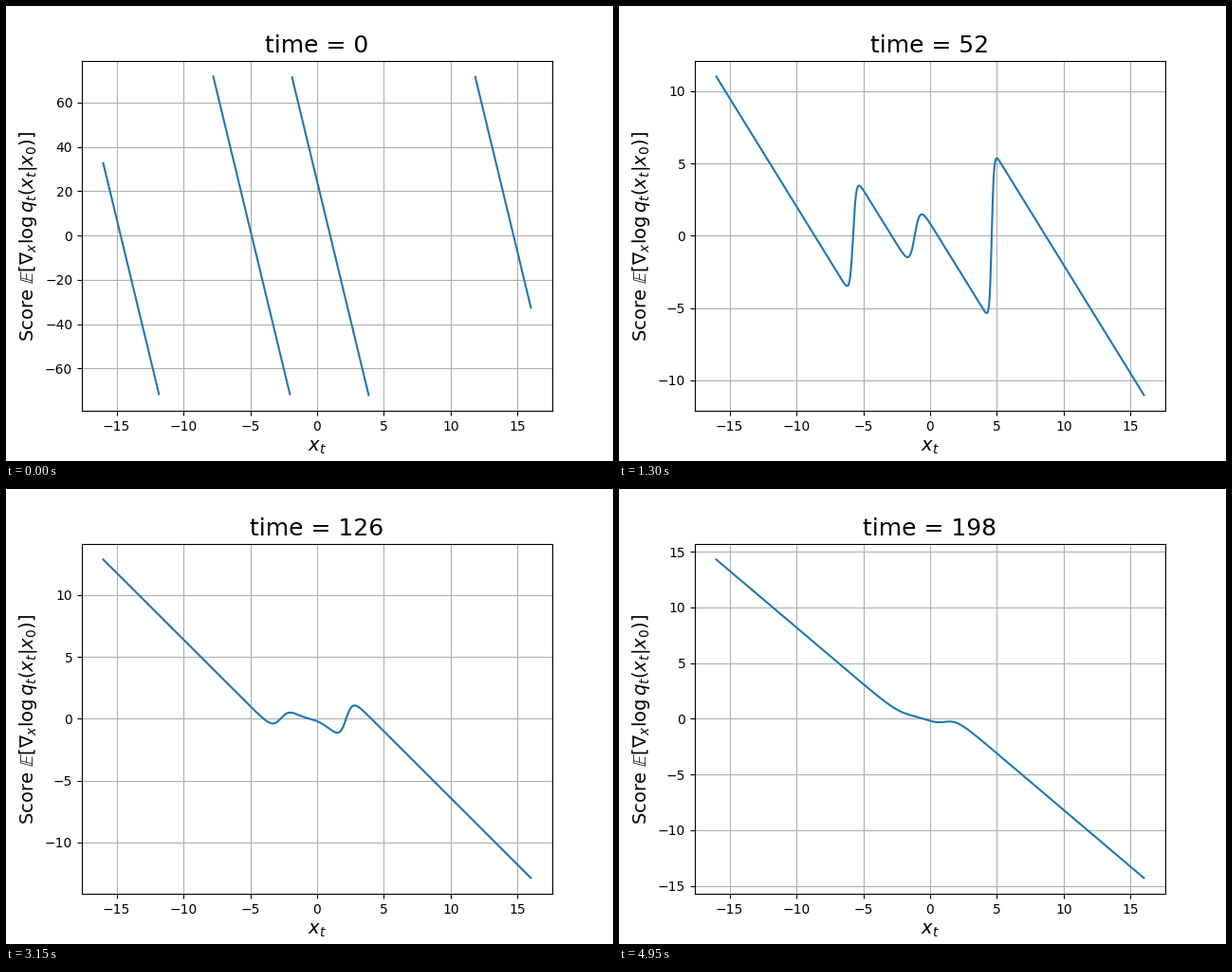
A matplotlib script that plays this animation: 640 by 480 pixels, repeating every 5 s.

```python
import numpy as np
import matplotlib.pyplot as plt
from matplotlib.animation import FuncAnimation

STEPS = 100
ALPHA = 0.96                            # signal power kept per step
POINTS = np.array([-15.0, -5.0, 1.0, 15.0])
REACH = 14.42                           # sigmas until the density underflows to zero

x = np.linspace(-16, 16, 1000)


def score(step):
    """Score of the noised mixture; NaN where every density is zero."""
    power = ALPHA ** (step + 1)
    var = 1 - power
    diff = np.sqrt(power) * POINTS[:, None] - x
    energy = diff ** 2 / (2 * var)
    nearest = energy.min(axis=0)
    weights = np.exp(nearest - energy)
    value = (weights * diff).sum(axis=0) / weights.sum(axis=0) / var
    value[nearest > REACH ** 2 / 2] = np.nan
    return value


fig, ax = plt.subplots(figsize=(6.4, 4.8), dpi=100)
line, = ax.plot(x, score(0))
title = ax.set_title("time = 0", fontsize=18)
ax.set_xlabel(r"$x_t$", fontsize=14)
ax.set_ylabel(r"Score $\mathbb{E}[\nabla_x \log q_t(x_t|x_0)]$", fontsize=14)
ax.set_xlim(-17.6, 17.6)
ax.grid(True)


def update(step):
    y = score(step)
    line.set_ydata(y)
    low, high = np.nanmin(y), np.nanmax(y)
    margin = 0.05 * (high - low)
    ax.set_ylim(low - margin, high + margin)
    title.set_text(f"time = {2 * step}")
    return line, title


anim = FuncAnimation(fig, update, frames=STEPS, interval=50, repeat=True)
plt.show()
```
